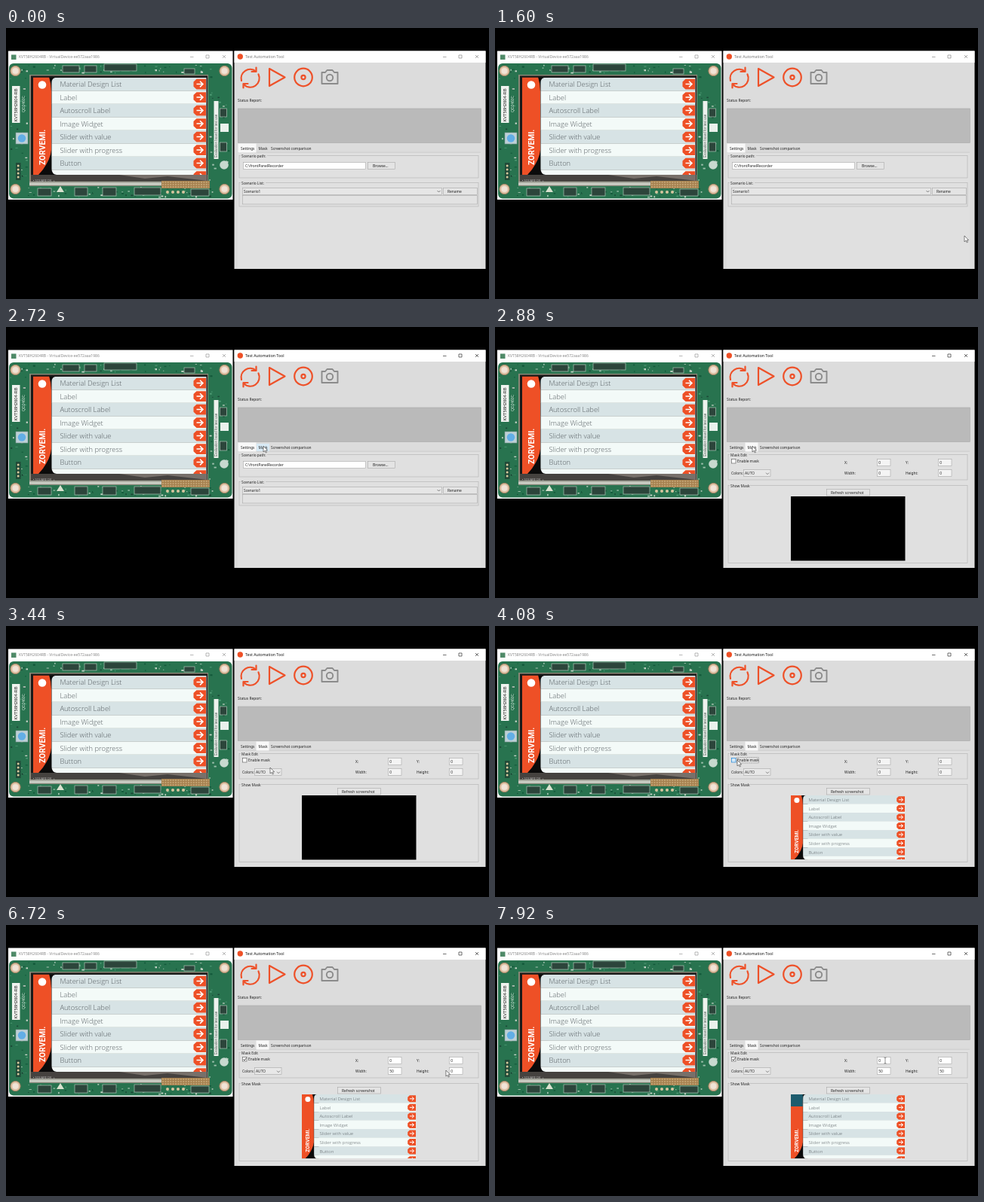
Recreate the animation shown at these times as an HTML page. Size 640 px wide and 360 px high, loop 8000 ms.

```html
<!DOCTYPE html>
<html lang="en">
<head>
<meta charset="utf-8">
<title>Test Automation Tool</title>
<style>
html, body { margin: 0; width: 100%; height: 100%; overflow: hidden; background: #000; }
svg { display: block; width: 640px; height: 360px; }
text { font: 4.85px "Noto Sans", "Open Sans", sans-serif; fill: #222; white-space: pre; }
.title { font-size: 5.2px; }
.row { font: 300 9.35px "Open Sans", "Noto Sans", sans-serif; fill: #555c60; }
.brand { font: 600 10.3px Roboto, sans-serif; fill: #fff; }
.board { font: 5px "Liberation Sans", sans-serif; fill: #d5e5da; }
.line { fill: none; stroke: #ee5129; stroke-width: 2.2; stroke-linecap: round; stroke-linejoin: round; }
.grey { stroke: #8b8b8b; stroke-width: 1.9; }
</style>
</head>
<body>
<svg id="stage" viewBox="0 0 640 360"></svg>
<script>
const ORANGE = "#ee5026";

const rect = (x, y, w, h, fill, more = "") =>
  `<rect x="${x}" y="${y}" width="${w}" height="${h}" fill="${fill}" ${more}/>`;
const circle = (x, y, r, fill, more = "") =>
  `<circle cx="${x}" cy="${y}" r="${r}" fill="${fill}" ${more}/>`;
const path = (d, more = "") => `<path d="${d}" ${more}/>`;
const text = (x, y, s, more = "") => `<text x="${x}" y="${y}" ${more}>${s}</text>`;
const group = (id, body, more = "") => `<g id="${id}" ${more}>${body}</g>`;
const upright = (x, y, s, cls, more = "") =>
  text(0, 0, s, `class="${cls}" transform="translate(${x} ${y}) rotate(-90)" ${more}`);
const outline = (color, w = 0.6) => `stroke="${color}" stroke-width="${w}"`;
const box = (x, y, w, h, fill = "#fff", id = "") =>
  rect(x + .5, y + .5, w - 1, h - 1, fill, outline("#a8a8a8") + (id && ` id="${id}"`));
const button = (x, y, w, h, s, tx, id) => box(x, y, w, h, "#e4e4e4", id) + text(tx, y + h - 2.9, s);
const chevron = (x, y) => path(`M${x - 2} ${y - 1}l2 2 2-2`, 'fill="none" stroke="#555" stroke-width=".7"');
const frame = (y, h, s, gap) =>
  rect(309, y, 317, h, "none", outline("#bcbcbc", .8)) +
  rect(311, y - 2, gap, 4, "#e0e0e0") + text(312, y + 2, s);

function controls(x, id) {
  return group(id,
    path(`M${x} 38.5h4.5`) + path(`M${x + 21} 36h4v4h-4z`) + path(`M${x + 43} 36l4 4m0-4l-4 4`),
    'fill="none" stroke="#999" stroke-width=".7"');
}

function display() {
  const rows = ["Material Design List", "Label", "Autoscroll Label", "Image Widget",
    "Slider with value", "Slider with progress", "Button", ""];
  const list = rows.map((s, i) => {
    const y = 65.8 + 17.5 * i, c = y + 8.8;
    const d = `M252.5 ${c - 6.8}H265V${c + 6.8}H252.5L248.5 ${c + 3.2}V${c - 3.2}z`;
    return rect(60, y, 207, 17.6, i % 2 ? "#f3faf8" : "#d7e3e5") +
      text(71.5, y + 12.5, s, 'class="row"') +
      path(d, `fill="${ORANGE}"`) +
      path(`M252.5 ${c}h8.5m-4-3.8l4 3.8-4 3.8`, 'fill="none" stroke="#fff" stroke-width="1.5"');
  }).join("");
  return `<clipPath id="screen"><rect x="36" y="65.8" width="229.5" height="129.2"/></clipPath>
    <clipPath id="list"><path d="M67 65.8H266V195H67Q60.500 194 60.500 187V73Q60.500 65.800 67 65.800z"/></clipPath>` +
    group("display",
      rect(36, 65, 34, 130, "#0b0b0b") +
      path("M36 65H57Q60 74 60 84V162Q59 174 49 188L43 195H36z", `fill="${ORANGE}"`) +
      circle(48, 75.5, 5.3, "#fff") +
      upright(51.8, 182, "ZORVEMI.", "brand") +
      `<g clip-path="url(#list)">${list}</g>`, 'clip-path="url(#screen)"');
}

function board() {
  let seed = 7;
  const rnd = () => (seed = seed * 16807 % 2147483647) / 2147483647;
  const tones = ["#12583a", "#4c9a73", "#9dbfac", "#1b4836", "#c8d4c8"];
  const specks = (n, x, y, w, h) => Array.from({ length: n }, () =>
    rect((x + rnd() * w).toFixed(1), (y + rnd() * h).toFixed(1),
      (1 + rnd() * 2.5).toFixed(1), (.7 + rnd() * 1.6).toFixed(1), tones[rnd() * 5 | 0])).join("");
  const hole = (x, y) => circle(x, y, 6.6, "#e0c3a6", outline("#a98263", 1)) + circle(x, y, 4, "#f1e3d6");
  const chip = (x, y, w, h) => rect(x, y, w, h, "#2c453b", outline("#a9c3b4", .7));

  return rect(4, 47, 295.5, 179.5, "#28734f", 'rx="6"') +
    specks(50, 20, 48, 258, 11) + specks(28, 5, 66, 22, 136) +
    specks(30, 269, 64, 26, 138) + specks(70, 22, 211, 255, 13) +
    [12.5, 289.5].map(x => hole(x, 57) + hole(x, 214)).join("") +
    chip(75, 50, 22, 9) + chip(104, 50, 16, 9) + chip(130, 48, 43, 9) + chip(236, 54, 14, 7) +
    rect(8, 77, 10.5, 49, "#f0f3ef") +
    upright(15.3, 124.5, "KVT58H2604-RB", "board", 'style="fill:#222;font-size:5.7px"') +
    upright(25, 112, "QD2460C", "board") +
    rect(13, 139, 16, 15, "#bdd0d6", outline("#7e9790")) + circle(21, 146.5, 5.2, "#62aee6") +
    rect(13, 179, 6.5, 23, "#214a38") +
    [182, 187, 192, 197].map(y => circle(16.2, y + 1, 1.5, "#d8c99c")).join("") +
    rect(275.5, 97, 6, 77, "#eef2ee") +
    upright(280, 172, "Evaluation board for test use", "board", 'style="fill:#4a5a52;font-size:4.5px"') +
    chip(283.5, 107, 9, 11) + rect(284, 127, 11, 11, "#e9f1ec") + chip(283.5, 152, 9, 12) +
    circle(289, 182, 5.8, "#c7d9cf") +
    rect(31, 62, 237, 148, "#8a8877") + rect(33, 63.5, 234, 140, "#1b1a19") +
    rect(33, 195, 234, 8.5, "#45423f") +
    path("M150 195l34 5 30-3 52 6V195z", 'fill="#77706a"') +
    text(36, 203.5, "▪ SQUARE DK  +", 'style="fill:#b8b8b8;font-size:4px"') +
    rect(31, 204, 237, 5.5, "#a8aaa0") + rect(31, 206.5, 175, 1.5, "#dfe2da") +
    rect(206, 203, 64, 10, "#a5804f") +
    path("M207 205h62m-62 3h62m-62 3h62", 'stroke="#dcc193" stroke-width="1" stroke-dasharray="2 1.400"') +
    chip(42, 213, 18, 10) + path("M67 218l5-8 5 8z", 'fill="#d9e2cf"') +
    chip(91, 212, 17, 11) + chip(128, 212, 18, 11) + chip(170, 212, 35, 10) +
    [214, 221, 228, 235].map(x => circle(x, 218, 2, "#d8c69f")).join("") + chip(245, 214, 24, 9);
}

function deviceWindow() {
  return rect(3, 30.5, 297.5, 197.5, "#fff") + rect(7, 35.5, 6.5, 6.5, "#4f8a68") +
    text(17, 40.3, "KVT58H2604RB - VirtualDevice-ee572aaa1986", 'style="fill:#888;font-size:5px"') +
    controls(244, "leftControls") + board() + display();
}

function toolbar() {
  return path("M312 70A12 12 0 0 1 331 57.500M334.500 61.500A12 12 0 0 1 315 75", 'class="line"') +
    path("M331.500 52.500V58H325.500M314.500 79.500V74H320.500", 'class="line"') +
    path("M349 54L369.500 65.500 349 77z", 'class="line"') +
    circle(394, 65.5, 11.8, "none", 'class="line"') +
    circle(394, 65.5, 2.6, "none", 'class="line"') +
    path("M418.500 59H423L425.500 56H432.500L435 59H439.500V74H418.500z", 'class="line grey"') +
    circle(429, 66, 4.2, "none", 'class="line grey"');
}

function settingsTab() {
  return frame(169.5, 29.5, "Scenario path:", 35) +
    box(314, 178, 163, 10) + text(317, 185, "C:\\frontPanelRecorder") +
    button(479, 178, 37, 10, "Browse...", 486) +
    frame(205.5, 31.5, "Scenario List:", 33) +
    box(313, 212, 265, 10, "#e6e6e6") + text(315, 219, "Scenario1") + chevron(573.5, 217) +
    button(579, 212, 46, 10, "Rename", 585) +
    box(313, 222, 312, 12.5, "#e2e2e2");
}

const fields = [["x", 506, 175, "X:", 463], ["y", 587, 175, "Y:", 544],
  ["w", 506, 189, "Width:", 463], ["h", 587, 189, "Height:", 544]];

function maskTab() {
  return frame(169.5, 33.5, "Mask Edit", 25) +
    rect(313.5, 175.5, 5.5, 5.5, "#fff", outline("#555") + ' id="check"') +
    path("M314.500 178.300l1.500 1.700 2.500-3.500", 'id="tick" fill="none" stroke="#222" stroke-width=".8"') +
    text(321, 180, "Enable mask") +
    rect(320.3, 174.5, 29, 7.5, "none", 'id="ring" stroke="#555" stroke-width=".5" stroke-dasharray="1 .7"') +
    text(313, 196, "Colors:") + box(329, 189, 36.5, 10, "#e8e8e8") +
    text(331, 196, "AUTO") + chevron(361, 194.7) +
    fields.map(([k, x, y, s, lx]) => text(lx, y + 7, s) + box(x, y, 18.5, 10, "#fff", k + "Box") +
      rect(x + 1.7, y + 1.5, 4, 7.5, "#0078d7", `id="${k}Sel"`) +
      text(x + 2.2, y + 7, "0", `id="${k}"`)).join("") +
    frame(210.5, 103, "Show Mask", 27) +
    button(439, 215, 58, 9.5, "Refresh screenshot", 445, "refresh") +
    rect(392, 225, 151.5, 85.5, "#000", 'id="blank"') +
    `<use id="shot" href="#display" transform="translate(392 225) scale(.66) translate(-36 -65.8)"/>` +
    rect(392, 225, 15.8, 16, "#1d5c6e", 'id="mask"');
}

function toolWindow() {
  return rect(302.5, 30.5, 333, 289.5, "#dcdcdc") + rect(302.5, 30.5, 333, 15.5, "#fff") +
    circle(310.3, 38, 3.7, ORANGE) +
    text(317, 40.3, "Test Automation Tool", 'class="title" id="heading"') + controls(579, "rightControls") +
    toolbar() + text(307, 97.7, "Status Report:") +
    rect(307.3, 107, 322, 45.5, "#bababa", outline("#a9a9a9")) +
    rect(307, 165.3, 322, 154.7, "#e0e0e0") + path("M307 165.200H629", outline("#c2c2c2")) +
    rect(332, 155, 17, 10, "#d8eaf5", 'id="hover"') +
    rect(307.5, 153.5, 24, 12, "#f8f8f8", 'id="tab"') +
    text(311, 162, "Settings") + text(334.5, 162, "Mask") + text(351, 162, "Screenshot comparison") +
    group("settings", settingsTab()) + group("masks", maskTab());
}

const pointer = group("arrow", path("M0 0V8L1.900 6.300 3.200 9 4.500 8.400 3.200 5.800H5.600z",
    'fill="#fff" stroke="#333" stroke-width=".6"')) +
  group("beam", path("M-1.500-4L0-3.600 1.500-4M0-3.600V3.600M-1.500 4L0 3.600 1.500 4",
    'fill="none" stroke="#444" stroke-width=".6"'));

document.getElementById("stage").innerHTML =
  rect(0, 0, 640, 360, "#000") + deviceWindow() + toolWindow() + group("pointer", pointer);

const $ = id => document.getElementById(id);
const show = (id, on) => { $(id).style.display = on ? "" : "none"; };
const set = (id, name, value) => $(id).setAttribute(name, value);

// Pointer stops: time, x, y
const stops = [[1600, 622, 276], [1680, 550, 276], [1920, 550, 276], [2640, 341, 158],
  [3120, 341, 158], [3440, 350, 188], [3760, 462, 215], [3920, 462, 215], [4080, 321, 178],
  [4320, 321, 178], [4800, 520, 193], [6160, 520, 193], [6880, 592, 193],
  [7360, 592, 193], [7840, 517, 180], [8000, 517, 180]];

function pointerAt(t) {
  const i = stops.findIndex((s, n) => n && t <= s[0]);
  const [a, x, y] = stops[i - 1], [b, u, v] = stops[i];
  const p = Math.max(0, (t - a) / (b - a)), e = p * p * (3 - 2 * p);
  return [x + (u - x) * e, y + (v - y) * e];
}

function draw(now) {
  const t = Math.floor(now % 8000 / 80) * 80;
  const onMask = t >= 2800, enabled = t >= 4160, active = t >= 1920;
  const [x, y] = pointerAt(t);

  $("heading").style.fill = active ? "#111" : "#777";
  set("rightControls", "stroke", active ? "#333" : "#888");

  show("settings", !onMask);
  show("masks", onMask);
  set("tab", "x", onMask ? 331.5 : 307.5);
  set("tab", "width", onMask ? 17 : 24);
  show("hover", t >= 2560 && !onMask);

  show("tick", enabled);
  show("ring", t >= 4080 && t < 4880);
  const near = t >= 4080 && t < 4400;
  set("check", "stroke", near ? "#0078d7" : "#555");
  set("check", "fill", near ? "#d5e9f8" : "#fff");
  set("refresh", "fill", t >= 3680 && t < 4000 ? "#e0eef8" : "#e4e4e4");
  show("blank", t < 4000);
  show("shot", t >= 4000);
  show("mask", t >= 7840);

  const value = {
    x: "0", y: "0",
    w: t < 5600 ? "0" : t < 5920 ? "" : t < 6160 ? "5" : "50",
    h: t < 7360 ? "0" : "50"
  };
  const selected = { w: t >= 5200 && t < 5600, h: t >= 7040 && t < 7360 };
  for (const [k] of fields) {
    $(k).textContent = value[k];
    $(k).style.fill = selected[k] ? "#fff" : "#222";
    show(k + "Sel", selected[k]);
    set(k + "Box", "fill", enabled ? "#fff" : "#f4f4f4");
  }

  const inField = enabled && fields.some(([, fx, fy]) => x > fx && x < fx + 18.5 && y > fy && y < fy + 10);
  show("pointer", t >= 1600);
  show("arrow", !inField);
  show("beam", inField);
  set("pointer", "transform", `translate(${x} ${y})`);
}

const start = performance.now();
function tick() {
  draw(performance.now() - start);
  requestAnimationFrame(tick);
}
tick();
</script>
</body>
</html>
```
